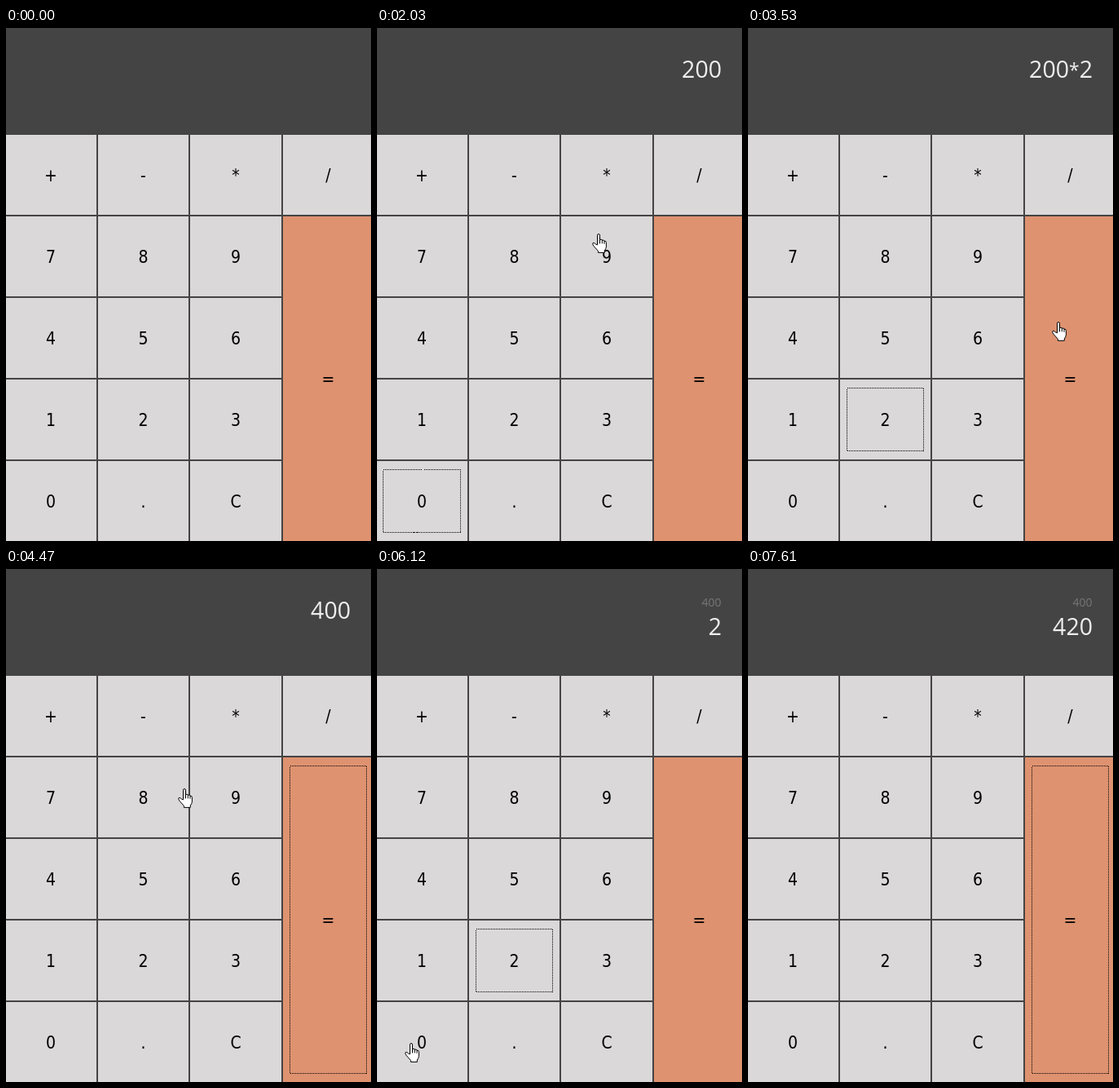
Recreate the animation shown at these times as an HTML page. Size 448 by 629 pixels, loop 8180 ms.

```html
<!DOCTYPE html>
<html lang="en">
<head>
<meta charset="utf-8">
<title>Calculator</title>
<style>
  html, body { margin: 0; width: 100%; height: 100%; overflow: hidden; background: #444; }
  svg { display: block; width: 448px; height: 629px; }
  .key { font: 21px "DejaVu Sans Condensed", "DejaVu Sans", sans-serif; font-stretch: condensed; text-anchor: middle; }
  .big, .small { font-family: "Open Sans", "Noto Sans", sans-serif; text-anchor: end; }
  .big { font-size: 28.5px; fill: #eee; }
  .small { font-size: 14px; fill: #777; }
  .focus { fill: none; stroke: #000; stroke-dasharray: 1 1; shape-rendering: crispEdges; }
</style>
</head>
<body>
<svg viewBox="0 0 448 629">
  <rect width="448" height="629" fill="#444"/>
  <g id="keys"></g>
  <rect id="focus" class="focus"/>
  <text id="small" class="small" x="422.5" y="46"></text>
  <text id="main" class="big" x="423"><tspan id="num"></tspan><tspan id="star" font-size="23" dy="-1"></tspan><tspan id="rest" dy="1"></tspan></text>
  <g id="hand" stroke="#000" stroke-linejoin="round" stroke-linecap="round">
    <path fill="#fff" d="M6.5 13.5V2.2Q6.5.6 8 .6T9.5 2.2V7.6Q11.4 6.5 12.3 8.2Q14.3 7.4 15 9.2Q17.4 8.8 17.4 11.2V16.2Q17.2 18.8 15.3 21V23.4H7.4V21.4L2.2 15.6Q-.2 12.6 1.1 11.6Q2.6 10.7 4.6 13Z"/>
    <path fill="none" d="M9.5 7.6V12M12.3 8.2V12M15 9.2V12.4"/>
  </g>
</svg>
<script>
const LOOP = 8180, HOLD = 140, GONE = 7610;
const ROWS = ["+-*/", "789=", "456", "123", "0.C"];

// Pointer stops: arrival, x, y, then the key and when it goes down
const STOPS = [
  [180, 195, 596],
  [510, 175, 479, "2", 590],
  [1100, 64, 570, "0", 1180],
  [1460, 64, 570, "0", 1460],
  [2190, 308, 183, "*", 2290],
  [2777, 158, 484, "2", 3010],
  [3530, 373, 360, "=", 3570],
  [4210, 373, 360],
  [4720, 61, 185, "+", 4790],
  [5380, 177, 481, "2", 5790],
  [6110, 34, 581, "0", 6220],
  [6960, 382, 424, "=", 7030],
  [7560, 347, 628]
].map(([at, x, y, key, down = at]) => ({ at, x, y, key, down, up: key ? down + HOLD : at }));

const MATH = {
  "+": (a, b) => a + b, "-": (a, b) => a - b,
  "*": (a, b) => a * b, "/": (a, b) => a / b
};

const $ = id => document.getElementById(id);

function set(el, attrs) {
  for (const name in attrs) el.setAttribute(name, attrs[name]);
  return el;
}

function add(tag, attrs) {
  const el = document.createElementNS("http://www.w3.org/2000/svg", tag);
  return $("keys").appendChild(set(el, attrs));
}

const keys = {};
const edge = c => Math.round(c * 113.2);
ROWS.forEach((row, r) => [...row].forEach((label, c) => {
  const tall = label === "=", y = 131 + r * 100, height = tall ? 398 : 98;
  const face = add("rect", { x: edge(c), y, width: edge(c + 1) - 2 - edge(c), height });
  add("text", { class: "key", x: 55 + c * 113.5, y: tall ? 438 : y + 57 }).textContent = label;
  const left = Math.round(7.4 + c * 113.5), right = Math.floor(102 + c * 113.5);
  keys[label] = {
    face,
    colors: tall ? ["#de9270", "#d98d6b"] : ["#dad8d9", "#d4d2d3"],
    ring: { x: left + .5, y: y + 10.5, width: right - left, height: height - 21 }
  };
}));

function type({ small, main, op, done }, key) {
  if (key === "=") {
    const [a, sign, b] = (small + op + main).split(/([-+*/])/);
    return { small, main: String(MATH[sign](+a, +b)), op: "", done: true };
  }
  if (done && MATH[key]) return { small: main, main: "", op: key };
  return { small, main: main + key, op };
}

function pointer(t) {
  const i = STOPS.findLastIndex(s => t >= s.at), a = STOPS[i], b = STOPS[i + 1];
  if (!b || t <= a.up) return a;
  const u = (t - a.up) / (b.at - a.up), s = u * u * (3 - 2 * u);
  return { x: a.x + (b.x - a.x) * s, y: a.y + (b.y - a.y) * s };
}

function draw(t) {
  let state = { small: "", main: "", op: "" }, focus, pressed;
  for (const { key, down, up } of STOPS) {
    if (!key || t < down) continue;
    focus = key;
    pressed = t < up && key;
    if (t >= up) state = type(state, key);
  }
  for (const k in keys) set(keys[k].face, { fill: keys[k].colors[k === pressed ? 1 : 0] });
  $("focus").style.display = focus ? "" : "none";
  if (focus) set($("focus"), keys[focus].ring);

  const [num, rest] = state.main.split("*");
  $("small").textContent = state.small;
  $("num").textContent = num;
  $("star").textContent = rest === undefined ? "" : "*";
  $("rest").textContent = rest || "";
  set($("main"), { y: state.small ? 81 : 61 });

  const shown = t >= STOPS[0].at && t < GONE;
  $("hand").style.display = shown ? "" : "none";
  if (shown) {
    const { x, y } = pointer(t);
    set($("hand"), { transform: `translate(${Math.round(x)} ${Math.round(y)})` });
  }
}

const start = performance.now();
function tick() {
  draw((performance.now() - start) % LOOP);
  requestAnimationFrame(tick);
}
tick();
</script>
</body>
</html>
```
